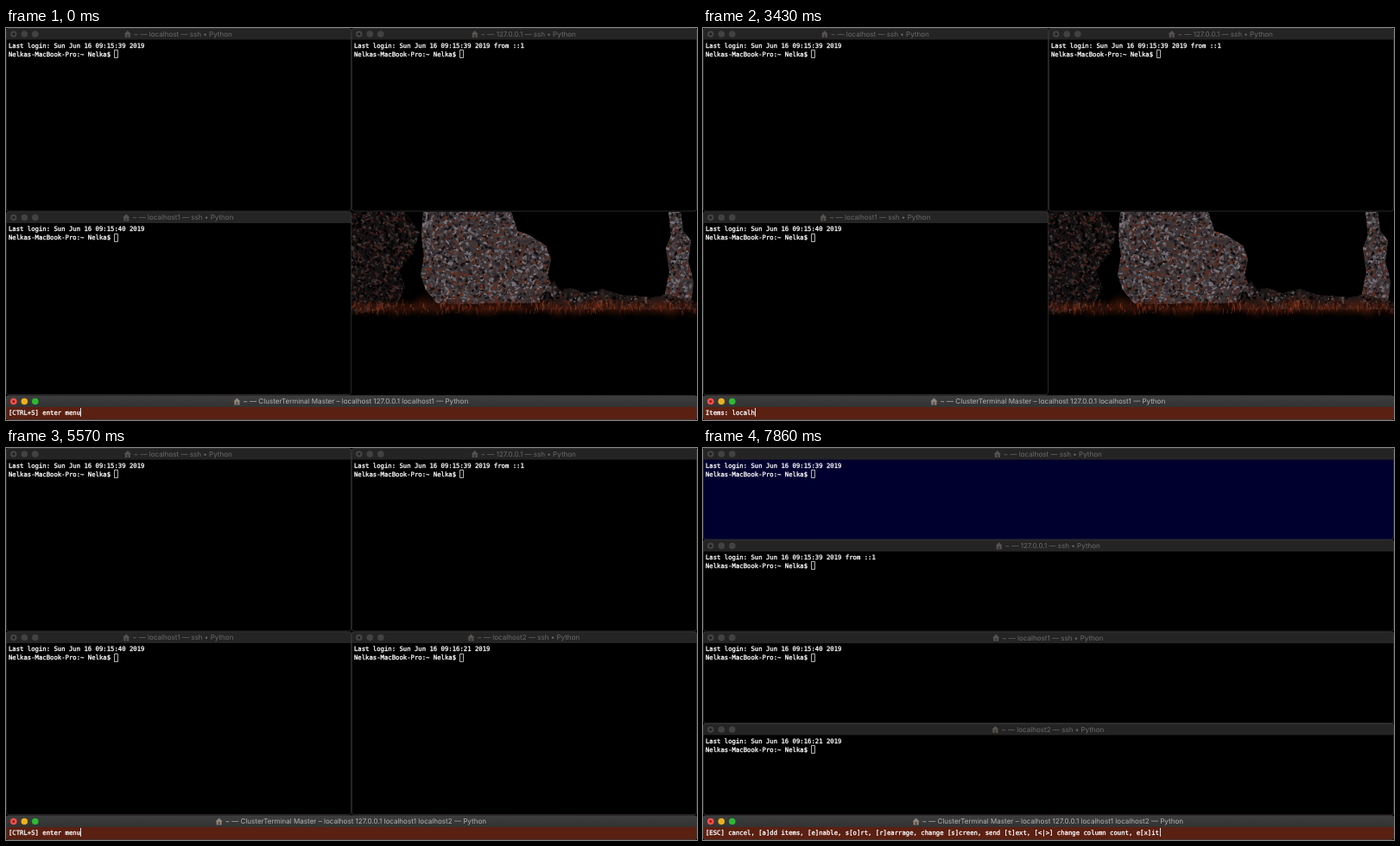
Recreate the animation shown at these times as an HTML page with a canvas. Size 800 by 454 pixels, loop 8 s.

```html
<!DOCTYPE html>
<html lang="en">
<head>
<meta charset="utf-8">
<title>Cluster terminal</title>
<style>
html, body { margin: 0; width: 100%; height: 100%; overflow: hidden; background: #000; }
canvas { display: block; width: 800px; height: 454px; }
</style>
</head>
<body>
<canvas id="stage" width="800" height="454"></canvas>
<script>
const W = 800, H = 454, LOOP = 8000;
const ctx = document.getElementById('stage').getContext('2d');
const MONO = '7.28px "DejaVu Sans Mono", monospace';
const SANS = '8.06px Inter, "Liberation Sans", sans-serif';
const CHAR = 4.383, BAR = 13;
const USER = 'Nelka';
const PROMPT = USER + 's-MacBook-Pro:~ ' + USER + '$ ';
const IDLE = '[CTRL+S] enter menu';
const MENU = '[ESC] cancel, [a]dd items, [e]nable, s[o]rt, [r]earrage, change [s]creen, ' +
  'send [t]ext, [<|>] change column count, e[x]it';
const SHELLS = [
  ['localhost', '09:15:39 2019'],
  ['127.0.0.1', '09:15:39 2019 from ::1'],
  ['localhost1', '09:15:40 2019'],
  ['localhost2', '09:16:21 2019']
];

// Seeded generator for the rock facets
let seed = 7;
function rand() {
  seed = (seed * 16807) % 2147483647;
  return seed / 2147483647;
}

function outline(c, pts) {
  c.beginPath();
  for (let i = 0; i < pts.length; i += 2) c.lineTo(pts[i], pts[i + 1]);
  c.closePath();
}

function rock(c, pts, base, tones, count) {
  const xs = pts.filter((v, i) => i % 2 === 0), ys = pts.filter((v, i) => i % 2);
  const x0 = Math.min(...xs), y0 = Math.min(...ys);
  const w = Math.max(...xs) - x0, h = Math.max(...ys) - y0;
  c.save();
  outline(c, pts);
  c.fillStyle = base;
  c.fill();
  c.clip();
  for (let i = 0; i < count; i++) {
    c.fillStyle = tones[Math.floor(rand() * tones.length)];
    c.beginPath();
    c.ellipse(x0 + rand() * w, y0 + rand() * h, 0.5 + rand() * 1.2, 0.8 + rand() * 2.4,
      rand() * 3, 0, 7);
    c.fill();
  }
  c.restore();
}

function makeWallpaper() {
  const cv = document.createElement('canvas');
  cv.width = W;
  cv.height = H;
  const c = cv.getContext('2d');
  const tones = ['#625f65', '#231e20', '#77727a', '#4f2a22', '#332d30', '#4d474b', '#62301f', '#141012'];
  const dark = ['#2c2727', '#050404', '#413637', '#42201a', '#000', '#0d0a0a'];
  rock(c, [395, 213, 462, 213, 479, 237, 471, 262, 455, 280, 462, 300, 452, 322, 395, 334],
    '#151011', dark, 1100);
  rock(c, [483, 213, 585, 213, 592, 235, 606, 240, 625, 252, 631, 268, 627, 286, 633, 300,
    625, 318, 500, 320, 486, 303, 480, 286, 484, 264, 481, 240], '#3d3638', tones, 2800);
  rock(c, [767, 213, 781, 213, 784, 235, 793, 246, 790, 270, 796, 295, 793, 318, 761, 318,
    768, 282, 764, 255, 770, 240], '#3a3437', tones, 700);
  rock(c, [618, 312, 634, 292, 641, 303, 653, 301, 670, 307, 690, 302, 712, 309, 750, 312,
    765, 308, 800, 318, 800, 326, 618, 326], '#1c1818', dark.concat('#5a5457'), 500);

  // Uneven grass: soft blobs along the foot of the rocks, then thin blades
  for (let i = 0; i < 46; i++) {
    const x = 405 + i * 8.7, y = 321 + rand() * 6, r = 9 + rand() * 7;
    const glow = c.createRadialGradient(x, y, 0, x, y, r);
    glow.addColorStop(0, 'rgba(104,38,18,' + (0.3 + rand() * 0.4) + ')');
    glow.addColorStop(1, 'rgba(60,20,10,0)');
    c.fillStyle = glow;
    c.fillRect(x - r, y - r, 2 * r, 2 * r);
  }
  const blades = ['#7a3119', '#46190d', '#1d0c08', '#94431f', '#2a100a'];
  c.lineWidth = 0.7;
  for (let i = 0; i < 420; i++) {
    const x = 400 + rand() * 400, y = 321 + rand() * 12;
    c.strokeStyle = blades[i % blades.length];
    c.beginPath();
    c.moveTo(x, y);
    c.lineTo(x + rand() * 3 - 1.5, y - 2 - rand() * 5);
    c.stroke();
  }
  const fade = c.createLinearGradient(0, 325, 0, 344);
  fade.addColorStop(0, 'rgba(0,0,0,0)');
  fade.addColorStop(1, '#000');
  c.fillStyle = fade;
  c.fillRect(395, 325, 405, 30);
  return cv;
}
const wallpaper = makeWallpaper();

// A hairline stroke gives the type its heavier screen weight
function mono(text, x, y) {
  ctx.font = MONO;
  ctx.fillStyle = ctx.strokeStyle = '#fff';
  ctx.lineWidth = 0.3;
  ctx.fillText(text, x, y);
  ctx.strokeText(text, x, y);
}

function cursor(x, y, active) {
  if (active) {
    ctx.fillStyle = '#ddd';
    ctx.fillRect(Math.round(x), y, 1, 10);
  } else {
    ctx.strokeStyle = '#b4b4b4';
    ctx.lineWidth = 1;
    ctx.strokeRect(Math.floor(x) + 0.5, y + 0.5, 4, 9);
  }
}

function disc(x, y, r, color) {
  ctx.fillStyle = color;
  ctx.beginPath();
  ctx.arc(x, y, r, 0, 7);
  ctx.fill();
}

function house(x, y, active) {
  ctx.fillStyle = active ? '#8d8780' : '#565350';
  outline(ctx, [x, y, x + 4, y - 4, x + 8, y, x + 7, y, x + 7, y + 4, x + 1, y + 4, x + 1, y]);
  ctx.fill();
  ctx.fillStyle = active ? '#5c4a3c' : '#3a3532';
  ctx.fillRect(x + 3, y + 0.5, 2, 3.5);
}

function frame(x, y, w, h, title, active, body) {
  ctx.save();
  ctx.beginPath();
  ctx.roundRect(x, y, w, h, 3);
  ctx.clip();
  ctx.fillStyle = body;
  ctx.fillRect(x, y, w, h);
  if (active) {
    const g = ctx.createLinearGradient(0, y, 0, y + BAR);
    g.addColorStop(0, '#3d3d3d');
    g.addColorStop(1, '#333');
    ctx.fillStyle = g;
  } else {
    ctx.fillStyle = '#242424';
  }
  ctx.fillRect(x, y, w, BAR + 0.5);
  ctx.restore();
  ctx.strokeStyle = '#3c3c3c';
  ctx.lineWidth = 0.7;
  ctx.beginPath();
  ctx.roundRect(x + 0.4, y + 0.4, w - 0.8, h - 0.8, 3);
  ctx.stroke();

  const cy = y + 7;
  const lights = active ? ['#fc4f48', '#eab120', '#2eb834'] : ['#424242', '#424242', '#424242'];
  lights.forEach((color, i) => disc(x + 8.8 + i * 12.5, cy, 3.8, color));
  disc(x + 8.8, cy, 1.3, active ? '#6d100c' : '#161616');

  if (!title) return;
  ctx.font = SANS;
  const left = x + w / 2 - 0.7 - (ctx.measureText(title).width + 11) / 2;
  house(left, cy, active);
  ctx.fillStyle = active ? '#b4b4b4' : '#6a6a6a';
  ctx.fillText(title, left + 11, y + 9.9);
}

function shell(i, x, y, w, h, active, body) {
  const [host, stamp] = SHELLS[i];
  frame(x, y, w, h, '~ — ' + host + ' — ssh • Python', active, body);
  mono('Last login: Sun Jun 16 ' + stamp, x + 3, Math.round(y + 22.6));
  mono(PROMPT, x + 3, Math.round(y + 32.6));
  cursor(x + 3 + PROMPT.length * CHAR, Math.round(y + 25), active);
}

function master(text, active, hosts) {
  const names = SHELLS.slice(0, hosts).map(s => s[0]).join(' ');
  frame(0, 425.5, W, 28.5, '~ — ClusterTerminal Master – ' + names + ' — Python', active, '#5a2012');
  mono(text, 3, 448);
  cursor(3 + text.length * CHAR, 440, active);
}

function masterText(t) {
  if (t < 1700) return IDLE;
  if (t < 2280) return MENU;
  if (t < 4130) {
    const typed = Math.floor((t - 2705) / 143) + 1;
    return 'Items: ' + 'localhost2'.slice(0, Math.max(0, typed));
  }
  if (t < 4850) return '';
  return t < 5850 ? IDLE : MENU;
}

function draw(t) {
  ctx.textRendering = 'geometricPrecision';
  ctx.textBaseline = 'alphabetic';
  ctx.lineJoin = 'round';
  ctx.fillStyle = '#000';
  ctx.fillRect(0, 0, W, H);
  ctx.drawImage(wallpaper, 0, 0);

  const busy = t >= 4130 && t < 4850;
  const opening = t >= 4280 && t < 4700;
  const count = t >= 4700 ? 4 : 3;
  // Shells move one after another into a single column
  const stacked = Math.floor((t - 6285) / 140) + 1;
  const place = i => i < stacked
    ? [0, i * 106.33, W, 106.33]
    : [i % 2 * 400, i < 2 ? 0 : 212.5, 400, 212.5];

  for (let i = count - 1; i > 0; i--) {
    if (opening && i === 1) continue;
    shell(i, ...place(i), false, '#000');
  }
  if (opening) frame(0, 71, 619, 318.5, '', false, '#000');
  shell(0, ...place(0), busy, t >= 7705 ? '#00002e' : '#000');
  master(masterText(t), !busy, t >= 4850 ? 4 : 3);
}

function tick(now) {
  draw(now % LOOP);
  requestAnimationFrame(tick);
}
draw(0);
requestAnimationFrame(tick);
</script>
</body>
</html>
```
